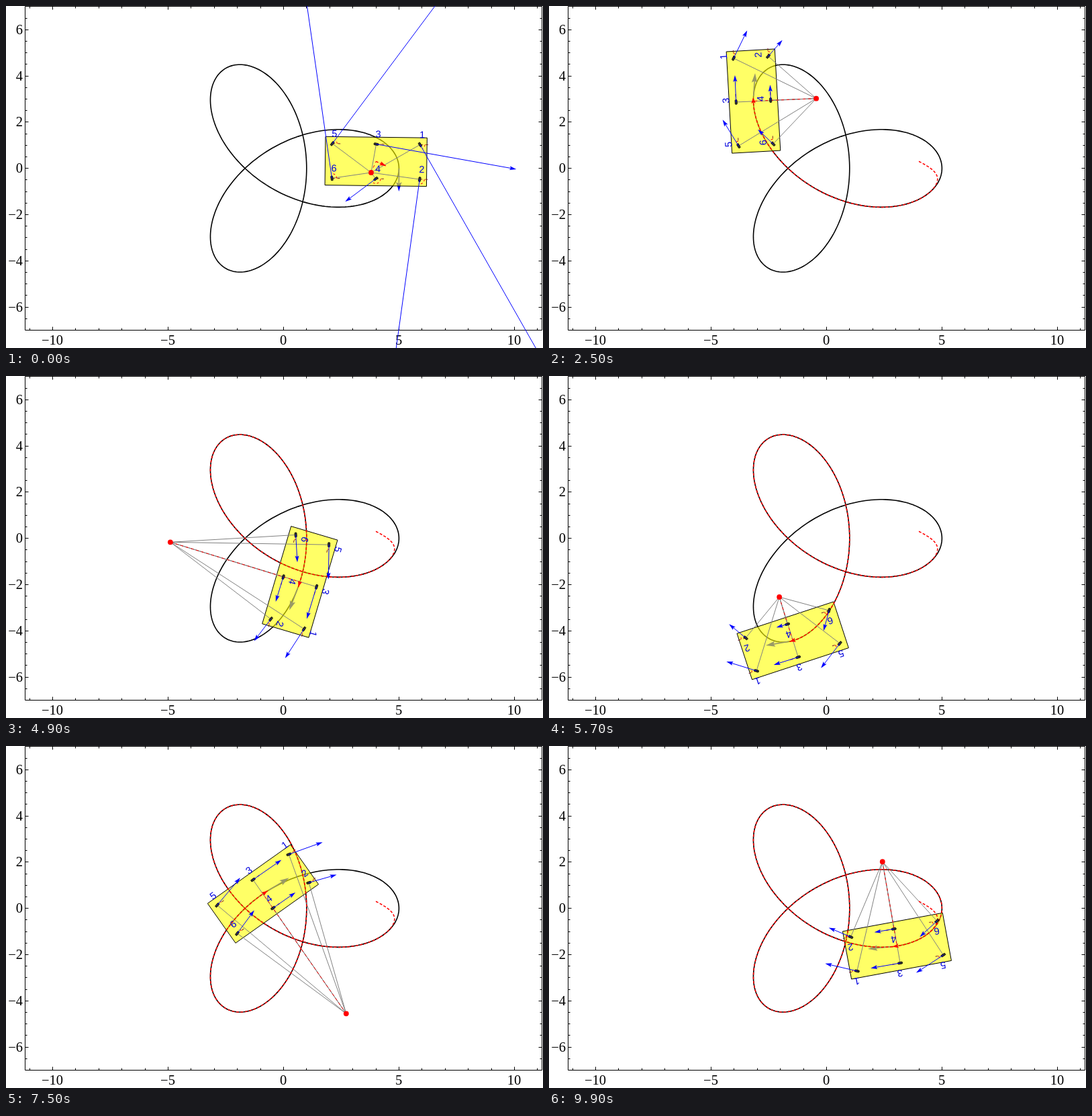
Recreate the animation shown at these times as an HTML page. Size 800x509 px, loop 10 s.

```html
<!DOCTYPE html>
<html lang="en">
<head>
<meta charset="utf-8">
<title>Six-wheeled rover on a trefoil path</title>
<style>
  html, body { margin: 0; width: 100%; height: 100%; overflow: hidden; background: #fff; }
  svg { display: block; width: 800px; height: 509px; }
  .axis { font: 20.5px "Liberation Serif", serif; fill: #000; }
  .tag { font: 14.5px "Liberation Sans", sans-serif; fill: #00d; text-anchor: middle; }
</style>
</head>
<body>
<svg viewBox="0 0 800 509">
  <g id="plot"></g>
  <g id="rover"></g>
</svg>
<script>
const { cos, sin, exp, atan2, hypot, floor, PI } = Math;
const UNIT = 34.4, X0 = 413.4, Y0 = 241.6;
const FRAME_MS = 100, FRAMES = 100;
const BLUE = '#00f', RED = '#f00';
const HALF_L = 2.2, HALF_W = 1.05;
const WHEELS = [[1.9, .75], [1.9, -.75], [0, .75], [0, -.75], [-1.9, .75], [-1.9, -.75]];
const ARROW_SCALE = .168;

const px = ([x, y]) => [X0 + UNIT * x, Y0 - UNIT * y];
const fix = v => v.toFixed(2);
const pts = list => list.map(p => px(p).map(fix).join()).join(' ');

// Path and its derivatives
const path = u => [2 * cos(u) + 3 * cos(2 * u), 2 * sin(u) - 3 * sin(2 * u)];
const vel = u => [-2 * sin(u) - 6 * sin(2 * u), 2 * cos(u) - 6 * cos(2 * u)];
const acc = u => [-2 * cos(u) - 12 * cos(2 * u), -2 * sin(u) + 12 * sin(2 * u)];
const tangent = u => { const [x, y] = vel(u); return atan2(y, x); };
const turnRate = u => {
  const [x, y] = vel(u), [ax, ay] = acc(u);
  return (x * ay - y * ax) / (x * x + y * y);
};

// SVG helpers
const poly = (list, attrs, tag = 'polyline') => `<${tag} points="${pts(list)}" ${attrs}/>`;
const stroke = (color, width, dash) =>
  `fill="none" stroke="${color}" stroke-width="${width}"` + (dash ? ` stroke-dasharray="${dash}"` : '');

function head(tip, angle, len, half, color) {
  const [x, y] = px(tip);
  return `<path d="M0 0L${-len} ${half}L${-len * .82} 0L${-len} ${-half}z" fill="${color}"
    transform="translate(${fix(x)} ${fix(y)}) rotate(${fix(-angle * 180 / PI)})"/>`;
}

function arrow(from, [dx, dy], color, width, len, half) {
  const size = hypot(dx, dy) || 1, cut = Math.max(0, 1 - len * .8 / UNIT / size);
  const tip = [from[0] + dx, from[1] + dy];
  const neck = [from[0] + dx * cut, from[1] + dy * cut];
  return poly([from, neck], stroke(color, width)) + head(tip, atan2(dy, dx), len, half, color);
}

function drawPlot() {
  const L = 28.5, R = 798.5, T = .5, B = 482.5;
  let ticks = '', text = '';
  const name = v => String(v).replace('-', '\u2212');
  for (let v = -11; v <= 11; v++) {
    const x = floor(X0 + UNIT * v) + .5, n = v % 5 ? 3 : 5;
    ticks += `M${x} ${B}v${-n}M${x} ${T}v${n}`;
    if (v % 5 === 0) text += `<text class="axis" x="${x - .5}" y="504" text-anchor="middle">${name(v)}</text>`;
  }
  for (let v = -6.5; v <= 6.5; v += .5) {
    const y = floor(Y0 - UNIT * v) + .5, n = v % 2 ? 3 : 5;
    ticks += `M${L} ${y}h${n}M${R} ${y}h${-n}`;
    if (v % 2 === 0) text += `<text class="axis" x="25" y="${y + 6.5}" text-anchor="end">${name(v)}</text>`;
  }
  const loop = Array.from({ length: 361 }, (_, i) => path(i * PI / 180));
  document.getElementById('plot').innerHTML =
    `<path d="M${L} ${T}H${R}V${B}H${L}z${ticks}" ${stroke('#000', 1)}/>` + text +
    poly(loop, stroke('#000', 1.6));
}

// Rover centre: the initial offset dies out along the path
const centre = s => {
  const [x, y] = path(s), e = exp(-20 * s);
  return [x - e, y + .3 * e];
};

function pose(n) {
  const s = n ? .069 * n + .004 : .0003;
  const e = exp(-20 * s), settled = 1 - e;
  const [vx, vy] = vel(s - .01 * settled);
  return {
    s,
    at: centre(s),
    angle: tangent(s - .017 * settled) + PI / 2 * exp(-25 * s),
    v: [vx * (1 - .5 * e) + 14.2 * e, vy * (1 - .5 * e) - 4.2 * e],
    spin: turnRate(s - .045 * settled) - 26 * e,
    ref: s + .04 * settled
  };
}

function drawWheel(i, at, heading, [vx, vy]) {
  const [x, y] = px(at), deg = -heading * 180 / PI;
  const dir = atan2(vy, vx), steer = atan2(sin(dir - heading), cos(dir - heading));
  const r = 7, ex = fix(r * cos(steer)), ey = fix(-r * sin(steer));
  return `<g transform="translate(${fix(x)} ${fix(y)}) rotate(${fix(deg)})">
      <path d="M0 0H12" ${stroke('#802030', 1, '4 4')}/>
      <path d="M${r} 0A${r} ${r} 0 0 ${steer > 0 ? 0 : 1} ${ex} ${ey}" ${stroke(RED, 1, '3 3')}/>
      <rect x="-3.4" y="-1.5" width="6.8" height="3" rx="1" fill="#333" stroke="#000" stroke-width=".8"
        transform="rotate(${fix(-steer * 180 / PI)})"/>
      <text class="tag" x="3" y="-10">${i + 1}</text>
    </g>` + arrow(at, [vx * ARROW_SCALE, vy * ARROW_SCALE], BLUE, 1, 10, 3);
}

function drawRover(n) {
  const { s, at, angle, v, spin, ref } = pose(n);
  const c = cos(angle), d = sin(angle);
  const place = ([x, y]) => [at[0] + x * c - y * d, at[1] + x * d + y * c];
  const pivot = [at[0] - v[1] / spin, at[1] + v[0] / spin];
  const wheels = WHEELS.map(place);
  const a = tangent(ref);

  const trail = [];
  for (let u = 0; u < s; u += .015) trail.push(centre(u));
  const tip = [at[0] + v[0] * .03, at[1] + v[1] * .03];
  trail.push(at, tip);

  const body = [[1, 1], [1, -1], [-1, -1], [-1, 1]].map(([x, y]) => place([x * HALF_L, y * HALF_W]));
  const [cx, cy] = px(pivot);

  document.getElementById('rover').innerHTML =
    arrow(path(ref), [cos(a), sin(a)], BLUE, 1.6, 14, 4.2) +
    poly(body, 'fill="#ff0" fill-opacity=".6" stroke="#000" stroke-width="1"', 'polygon') +
    wheels.map(w => poly([pivot, w], stroke('#808080', 1))).join('') +
    poly([pivot, at], stroke(RED, 1, '4 4')) +
    poly(trail, stroke(RED, 1.5, '4 2.5')) +
    head(tip, atan2(v[1], v[0]), 9, 3.2, RED) +
    wheels.map((w, i) => drawWheel(i, w, angle,
      [-spin * (w[1] - pivot[1]), spin * (w[0] - pivot[0])])).join('') +
    `<circle cx="${fix(cx)}" cy="${fix(cy)}" r="3.9" fill="${RED}"/>`;
}

drawPlot();
const start = performance.now();
let shown = -1;
function tick() {
  const n = floor((performance.now() - start) / FRAME_MS) % FRAMES;
  if (n !== shown) drawRover(shown = n);
  requestAnimationFrame(tick);
}
tick();
</script>
</body>
</html>
```
